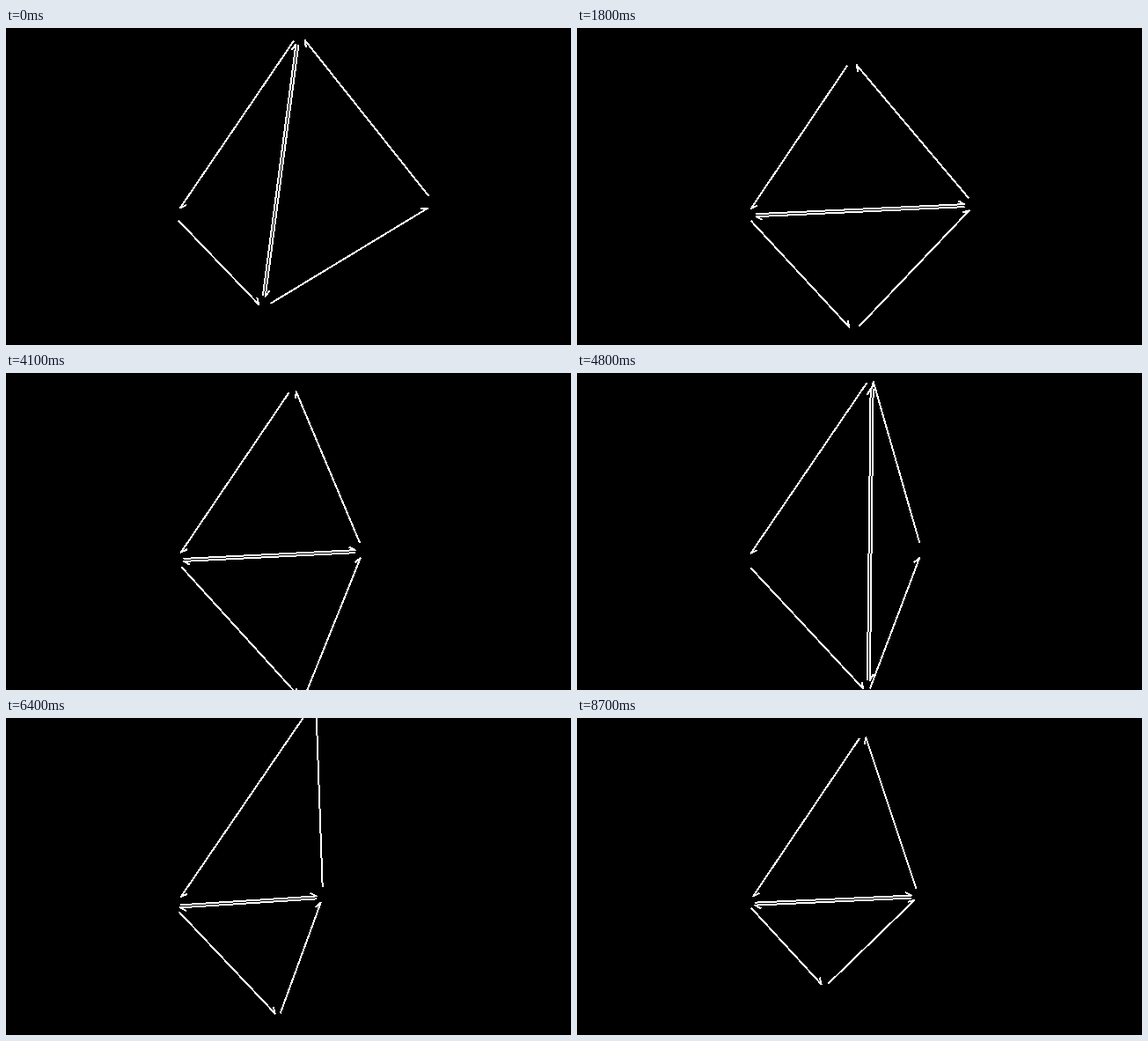
An HTML page that plays this animation: 642 by 360 pixels, repeating every 8800 ms.

```html
<!DOCTYPE html>
<html lang="en">
<head>
<meta charset="utf-8">
<title>Edge flip</title>
<style>
  html, body { margin: 0; height: 100%; overflow: hidden; background: #000; }
  svg { display: block; width: 642px; height: 360px; }
  path { fill: none; stroke: #fff; stroke-width: 2; stroke-linejoin: round; shape-rendering: crispEdges; }
</style>
</head>
<body>
<svg viewBox="0 0 642 360"><path id="edges"/></svg>
<script>
const LOOP = 8800, STEP = 100;
const FLIP_START = 1000, FLIP_PERIOD = 1200;
const GAP = 0.05, OFFSET = 1.5, BARB = 8, BARB_ANGLE = Math.PI / 6;

const mix = (a, b, k) => a + (b - a) * k;

// Constant speed along a line; the direction reverses at each turn (seconds)
function runner(x, y, vx, vy, turns) {
  return t => {
    const travel = turns.reduce((sum, turn, i) =>
      sum + (i % 2 ? 2 : -2) * Math.max(0, t - turn), t);
    return [x + vx * travel, y + vy * travel];
  };
}

const topAt = runner(333, 3, -11.7, 16.6, [2.3, 6.37]);
const rightAt = runner(489.6, 200.1, -20, 0.5, [6.84]);
const bottomAt = runner(291.2, 320.3, 12.9, 15.1, [2, 2.24, 4.19]);

// The left vertex trembles along a short diagonal while drifting slowly
function leftAt(t) {
  const shift = 0.2 * t - 1.45 * Math.cos(2 * Math.PI * (t - 2.94) / 1.7);
  return [189.3 + shift, 214.3 - 0.95 * shift];
}

// Shortened arrow from a to b, shifted into its face, with a one-sided barb
function halfEdge([ax, ay], [bx, by]) {
  const dx = bx - ax, dy = by - ay, length = Math.hypot(dx, dy);
  const nx = dy / length * OFFSET, ny = -dx / length * OFFSET;
  const endX = mix(bx, ax, GAP) + nx, endY = mix(by, ay, GAP) + ny;
  const angle = Math.atan2(-dy, -dx) + BARB_ANGLE;
  return `M${mix(ax, bx, GAP) + nx} ${mix(ay, by, GAP) + ny}L${endX} ${endY}` +
    `l${BARB * Math.cos(angle)} ${BARB * Math.sin(angle)}`;
}

const edges = document.getElementById('edges');

function draw(now) {
  const ms = Math.floor(now % LOOP / STEP) * STEP;
  const [t, l, b, r] = [topAt, leftAt, bottomAt, rightAt].map(at => at(ms / 1000));
  const flips = Math.floor((ms - FLIP_START) / FLIP_PERIOD) + 1;
  const [p, q] = flips % 2 ? [l, r] : [t, b];
  edges.setAttribute('d', [[t, l], [l, b], [b, r], [r, t], [p, q], [q, p]]
    .map(([from, to]) => halfEdge(from, to)).join(''));
}

const start = performance.now();
function tick() {
  draw(performance.now() - start);
  requestAnimationFrame(tick);
}
tick();
</script>
</body>
</html>
```
